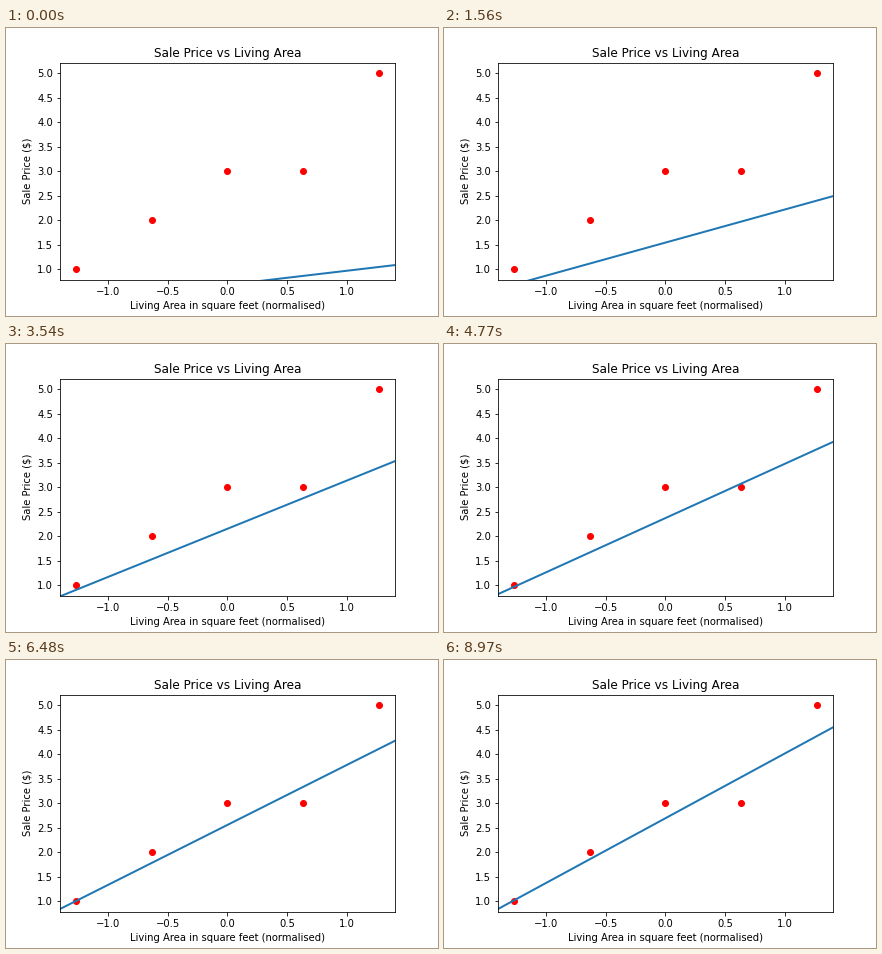
A matplotlib script for the animation above (9000 ms loop, 432 by 288 pixels).

```python
import numpy as np
import matplotlib.pyplot as plt
from matplotlib.animation import FuncAnimation

FRAMES, INTERVAL = 300, 30
RATE, WARMUP = 0.01, 28  # learning rate, descent steps done before the loop starts

plt.rcParams.update({"font.family": "DejaVu Sans", "font.size": 10})

area = np.arange(1, 6)
price = np.array([1, 2, 3, 3, 5])
x = (area - area.mean()) / area.std(ddof=1)

# Least-squares fit that the descent converges to
best_bias = price.mean()
best_slope = (x @ price) / (x @ x)
curvature = (x @ x) / len(x)


def fit(step):
    """Intercept and slope after a number of gradient steps from zero."""
    bias = best_bias * (1 - (1 - RATE) ** step)
    slope = best_slope * (1 - (1 - RATE * curvature) ** step)
    return bias, slope


def padded(data, pixels, radius=3):
    """Limits with room for the markers plus a 5% margin."""
    half = 1.1 * (np.ptp(data) / 2 + radius / pixels)
    mid = (data.min() + data.max()) / 2
    return mid - half, mid + half


fig = plt.figure(figsize=(6, 4), dpi=72, facecolor="white")
ax = fig.add_axes([0.125, 0.125, 0.775, 0.755])
ax.scatter(x, price, s=36, color="red", linewidths=1)
line, = ax.plot([], [], color="#1f77b4", lw=2)

ax.set_xlim(padded(x, 334.8))
ax.set_ylim(padded(price, 217.44))
ax.set_xticks(np.arange(-1, 1.1, 0.5))
ax.set_yticks(np.arange(1, 5.1, 0.5))
ax.set_title("Sale Price vs Living Area", fontsize=12)
ax.set_xlabel("Living Area in square feet (normalised)")
ax.set_ylabel("Sale Price ($)")

span = np.array([-3, 3])


def update(i):
    bias, slope = fit(WARMUP + i)
    line.set_data(span, bias + slope * span)
    return line,


anim = FuncAnimation(fig, update, frames=FRAMES, interval=INTERVAL,
                     repeat=True, repeat_delay=0, blit=False)
plt.show()
```
